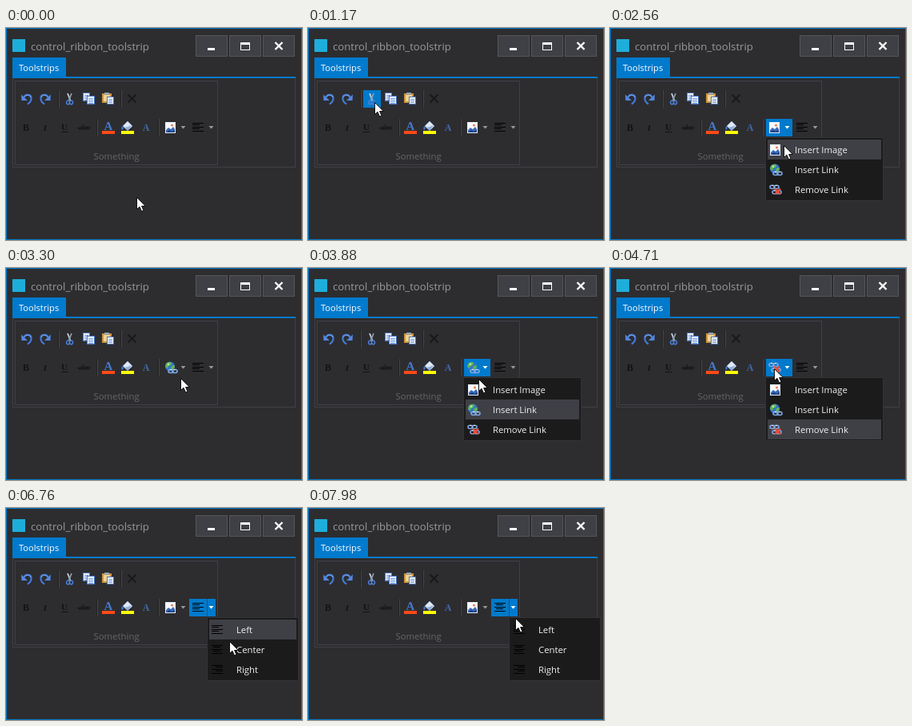
An HTML page with a canvas for the animation above (8 s loop, 370x266 px).

```html
<!DOCTYPE html>
<html lang="en">
<head>
<meta charset="utf-8">
<title>Ribbon toolstrip</title>
<style>
html, body { margin: 0; width: 100%; height: 100%; overflow: hidden; background: #2d2d30; }
canvas { display: block; }
</style>
</head>
<body>
<canvas id="stage" width="370" height="266"></canvas>
<script>
const ctx = document.getElementById('stage').getContext('2d');
const LOOP = 8000;
const BLUE = '#007acc', BACK = '#2d2d30', LINE = '#3f3f46', INK = '#121214';
const SANS = '"Open Sans", "Noto Sans", sans-serif';

// Pointer moves: start, end, target x/y, optional curve control x/y
const START = [163, 212];
const MOVES = [
  [30, 480, 27, 93, 80, 130],
  [520, 830, 70, 94],
  [850, 945, 83, 93],
  [1300, 1965, 213, 128, 150, 92],
  [2130, 2540, 217, 147],
  [2610, 2890, 222, 178],
  [2980, 3300, 218, 138],
  [3340, 3560, 212, 128],
  [3800, 4130, 219, 202],
  [4220, 4580, 205, 126],
  [4750, 4910, 215, 152],
  [5140, 5460, 240, 126, 236, 150],
  [6040, 6290, 256, 126],
  [6430, 6900, 285, 178],
  [7160, 7590, 257, 128],
  [7770, 7980, 259, 138]
];

// `kept` is the row still highlighted from the previous opening
const MENUS = [
  { from: 2090, to: 2980, owner: 'insert', kept: -1 },
  { from: 3720, to: 4180, owner: 'insert', kept: 1 },
  { from: 4710, to: 5140, owner: 'insert', kept: 2 },
  { from: 6430, to: 7160, owner: 'align', kept: -1 },
  { from: 7770, to: 8000, owner: 'align', kept: 1 }
];
const LISTS = {
  insert: { x: 194, w: 148, rows: [['Insert Image', 'image'], ['Insert Link', 'link'], ['Remove Link', 'unlink']] },
  align: { x: 251, w: 115, rows: [['Left', 'left'], ['Center', 'center'], ['Right', 'right']] }
};
const BUTTONS = [[26, 78], [49, 78], [80, 78], [103, 78], [127, 78], [128, 114], [152, 114], [175, 114]];

function pointer(t) {
  let [x, y] = START;
  for (const [a, b, tx, ty, cx = (x + tx) / 2, cy = (y + ty) / 2] of MOVES) {
    if (t <= a) break;
    const u = Math.min(1, (t - a) / (b - a)), k = u * u * (3 - 2 * u), m = 1 - k;
    x = m * m * x + 2 * m * k * cx + k * k * tx;
    y = m * m * y + 2 * m * k * cy + k * k * ty;
  }
  return [Math.round(x), Math.round(y)];
}

const inside = ([px, py], x, y, w, h) => px >= x && px < x + w && py >= y && py < y + h;

function box(x, y, w, h, color) {
  ctx.fillStyle = color;
  ctx.fillRect(x, y, w, h);
}
function frame(x, y, w, h, color) {
  ctx.strokeStyle = color;
  ctx.lineWidth = 1;
  ctx.strokeRect(x + .5, y + .5, w - 1, h - 1);
}
function fill(d, color) {
  ctx.fillStyle = color;
  ctx.fill(new Path2D(d));
}
function line(d, color, width = 1) {
  ctx.strokeStyle = color;
  ctx.lineWidth = width;
  ctx.stroke(new Path2D(d));
}
function disc(x, y, r, color) {
  ctx.fillStyle = color;
  ctx.beginPath();
  ctx.arc(x, y, r, 0, 7);
  ctx.fill();
}
function text(s, x, y, color, font = '11.3px ' + SANS, align = 'left') {
  ctx.font = font;
  ctx.textAlign = align;
  ctx.fillStyle = color;
  ctx.fillText(s, x, y);
}
function at(x, y, draw, flip = 1) {
  ctx.save();
  ctx.translate(x, y);
  ctx.scale(flip, 1);
  draw();
  ctx.restore();
}

function alignLines(side) {
  for (let i = 0; i < 5; i++) {
    const w = i % 2 ? 9 : 14, gap = 14 - w;
    box(1 + (side === 'left' ? 0 : side === 'right' ? gap : gap / 2 | 0), 2 + i * 2.5 | 0, w, 1, '#000');
  }
}
function chain(x, y) {
  for (const dx of [0, 5]) {
    line(`M${x + dx + 2} ${y}h2a2 2 0 0 1 0 4h-2a2 2 0 0 1 0 -4z`, '#7fa9e4', 1.6);
    line(`M${x + dx + 2} ${y}h2`, '#e4efff', 1);
  }
}
const ICONS = {
  image() {
    box(1, 1, 13, 14, '#e9eef7');
    box(2, 2, 11, 12, '#f9fbff');
    fill('M2 14V11L5 8l3 2 3-3 2 3v4z', '#3b69b4');
    fill('M2 14l4-3 3 2 4-2v3z', '#183f83');
    disc(9.5, 5, 1.6, '#ec8052');
  },
  link() {
    disc(7, 6.5, 6, '#3475c6');
    fill('M3 2q4-2 6 0L8 5 5 6 4 9 1 7q0-3 2-5zM9 6l4-1q0 4-3 6L8 9z', '#62b653');
    disc(5, 3.8, 1.4, '#b8e79f');
    chain(5, 10.5);
  },
  unlink() {
    chain(1, 2.5);
    chain(4, 9);
    line('M7 6.5l7 7M14 6.5l-7 7', '#f04a32', 2.3);
  },
  left: () => alignLines('left'),
  center: () => alignLines('center'),
  right: () => alignLines('right')
};

function curvedArrow() {
  line('M3 6C5 0 13 1 12.5 7C12.3 10 11 11.5 8 13.5', '#4379d4', 2.3);
  line('M4 4.5C6 1 11 1.5 12 5', '#78a7f0', 1);
  fill('M0 1.5L.5 9H8z', '#5288df');
}
function scissors() {
  line('M3.5 0L7 9', '#cbd3df', 1.7);
  line('M8.5 0L5 9', '#8e9baf', 1.7);
  line('M4 9a2 2.4 0 1 0 .1 0M8 9a2 2.4 0 1 0 .1 0', '#4d80d5', 1.5);
}
function page(x, y, w, h) {
  box(x, y, w, h, '#f2f6ff');
  frame(x, y, w, h, '#4777c2');
  for (let i = 3; i < h - 1; i += 2) box(x + 2, y + i, w - 4, 1, '#6e99da');
}
function paste() {
  box(0, 1, 12, 12, '#c9953e');
  box(2, 3, 8, 8, '#f0d28d');
  box(3, 0, 6, 3, '#9aa3b1');
  page(6, 5, 9, 10);
}
function bucket() {
  fill('M2 6L8 0l6 6-6 5.5z', '#dfe8f4');
  line('M2 6L8 0l6 6-6 5.5z', '#8da4c2');
  fill('M8 7l5-2-5 6.5L4 8z', '#8fadd5');
  fill('M2 6Q-1 8 1 11Q4 10 2 6z', '#3f79d4');
}
function divider(x, y) {
  box(x, y, 1, 22, '#222225');
  box(x + 1, y, 1, 22, '#46464a');
}
function caret(x, color) {
  fill(`M${x - 3} 123h6l-3 3.5z`, color);
}

function drawWindow() {
  box(0, 0, 370, 266, BACK);
  frame(0, 0, 370, 266, BLUE);
  box(8, 14, 16, 16, '#1eaedb');
  text('control_ribbon_toolstrip', 31, 28, '#999', '13.2px ' + SANS);
  for (const x of [237, 279, 321]) {
    box(x, 9, 40, 27, '#3f3f46');
    frame(x, 9, 40, 27, '#555559');
  }
  box(252, 25, 9, 3, '#fff');
  frame(293, 18, 12, 10, '#fff');
  box(293, 18, 12, 3, '#fff');
  line('M336.5 18l9 9M345.5 18l-9 9', '#fff', 2.4);

  frame(8, 62, 354, 113, LINE);
  box(8, 37, 67, 25, BLUE);
  box(8, 61, 354, 2, BLUE);
  text('Toolstrips', 16, 54, '#fff', '11.1px ' + SANS);
  frame(11, 66, 254, 106, LINE);
  text('Something', 138, 165, '#656565', '11.4px ' + SANS, 'center');
}

function drawTools() {
  at(19, 82, curvedArrow);
  at(56, 82, curvedArrow, -1);
  at(73.5, 82, scissors);
  page(96, 81, 9, 11);
  page(101, 85, 10, 11);
  at(120, 81, paste);
  line('M152.5 83.5l10 10M162.5 83.5l-10 10', '#19191b', 2);
  divider(65, 78);
  divider(143, 78);
  divider(113, 114);
  divider(190, 114);

  const serif = '"Liberation Serif", serif';
  text('B', 25, 129, INK, 'bold 12px ' + serif, 'center');
  text('I', 49, 129, INK, 'italic bold 11px ' + serif, 'center');
  text('U', 73, 128, INK, 'bold 11px ' + serif, 'center');
  box(69, 130, 9, 1, INK);
  text('abc', 98, 128, INK, '10px ' + serif, 'center');
  box(89, 125, 17, 1, INK);
  text('A', 128, 128, '#4779c9', 'bold 15px ' + serif, 'center');
  box(120, 129, 16, 4, '#ff4b17');
  at(144, 117, bucket);
  box(144, 129, 16, 4, '#ffff00');
  text('A', 175, 129, '#446ba9', 'bold 12px ' + serif, 'center');
}

function drawMenu(menu, pos) {
  const { x, w, rows } = LISTS[menu.owner];
  const over = inside(pos, x, 140, w, 75) ? Math.floor((pos[1] - 140) / 25) : pos[1] < 136 ? menu.kept : -1;
  box(x, 137, w, 80, '#1b1b1c');
  frame(x, 137, w, 80, '#333337');
  rows.forEach(([label, icon], i) => {
    const y = 140 + i * 25;
    if (i === over) box(x + 3, y, w - 6, 25, LINE);
    at(x + 5, y + 5, ICONS[icon]);
    text(label, x + 37, y + 17, '#f1f1f1');
  });
}

function drawPointer([x, y]) {
  at(x, y, () => {
    const d = 'M.5 .5V15.5L4 12.3L6.5 18L9 17L6.6 11.5H11.3Z';
    fill(d, '#fff');
    line(d, '#111', 1);
  });
}

function render(t) {
  const pos = pointer(t);
  const menu = MENUS.find(m => t >= m.from && t < m.to);
  const owner = menu && menu.owner;
  const insertOn = owner === 'insert' || !menu && inside(pos, 194, 114, 34, 22);
  const alignOn = owner === 'align' || !menu && inside(pos, 229, 114, 33, 22);
  const insertIcon = t >= 5140 || t < 2980 ? 'image' : t < 4180 ? 'link' : 'unlink';

  drawWindow();
  if (!menu) {
    for (const [cx, y] of BUTTONS) if (inside(pos, cx - 11, y, 22, 22)) box(cx - 11, y, 22, 22, BLUE);
  }
  drawTools();

  if (insertOn) box(195, 114, 33, 22, BLUE);
  at(198, 117, ICONS[insertIcon]);
  caret(221.5, insertOn ? '#fff' : '#999');

  if (alignOn) {
    box(229, 114, 33, 22, BLUE);
    if (t >= 5680 && t < 5820) box(229, 114, 22, 22, '#0e6198');
    box(251, 114, 1, 22, '#245273');
  }
  at(232, 117, ICONS[t < 7160 ? 'left' : 'center']);
  caret(256.5, alignOn ? '#fff' : '#999');

  if (menu) drawMenu(menu, pointer(t - 40));
  drawPointer(pos);
}

function tick() {
  render(performance.now() % LOOP);
  requestAnimationFrame(tick);
}
tick();
</script>
</body>
</html>
```
